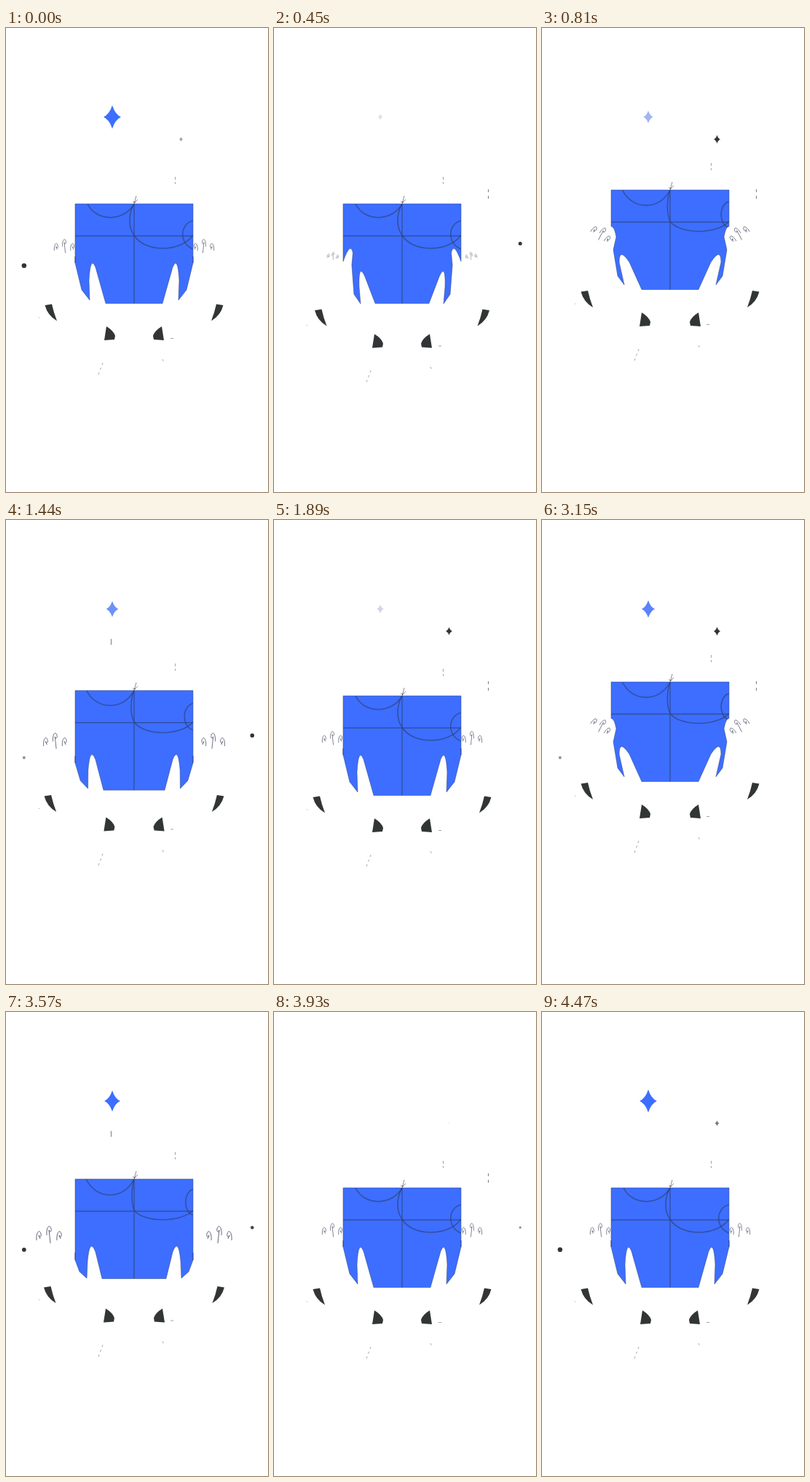
An HTML page with a canvas for the animation above (4.5 s loop, 360x636 px).

```html
<!DOCTYPE html>
<html>
<head>
<meta charset="utf-8">
<style>
html, body { margin: 0; width: 100%; height: 100%; overflow: hidden; background: #fff; }
canvas { display: block; width: 100%; height: 100%; }
</style>
</head>
<body>
<canvas id="stage" width="360" height="636"></canvas>
<script>
const ctx = document.getElementById('stage').getContext('2d');
const LOOP = 4500, JUMP = 2250, TWINKLE = 1125, STEP = 30;
const REST_TOP = 241, BOX_HEIGHT = 136.5, AXIS = 176;
const BLUE = [61, 110, 255], INK = [50, 53, 54], PALE = [222, 224, 230];
const LINE = 'rgba(45,62,110,.62)', FAINT = 'rgba(70,70,85,.7)';

const mix = (a, b, u) => a + (b - a) * u;
const clamp = u => Math.min(1, Math.max(0, u));
const ramp = (time, from, to) => {
  const u = clamp((time - from) / (to - from));
  return u * u * (3 - 2 * u);
};
const bump = (time, from, full, fade, end) => ramp(time, from, full) - ramp(time, fade, end);

// Sparkles swell and shrink around a centre time, wrapping over the twinkle period.
function glow(time, centre, halfWidth) {
  const offset = (time - centre + TWINKLE * 1.5) % TWINKLE - TWINKLE / 2;
  return Math.abs(offset) < halfWidth ? Math.cos(Math.PI / 2 * offset / halfWidth) ** .6 : 0;
}

function tint(color, strength) {
  const u = clamp((strength - .35) / .5);
  return `rgb(${color.map((c, i) => mix(PALE[i], c, u))})`;
}

function star(x, y, height, color, strength) {
  const h = height * strength, w = h * .75, p = h * .24;
  ctx.fillStyle = tint(color, strength);
  ctx.beginPath();
  ctx.moveTo(x, y - h);
  ctx.quadraticCurveTo(x + p, y - p, x + w, y);
  ctx.quadraticCurveTo(x + p, y + p, x, y + h);
  ctx.quadraticCurveTo(x - p, y + p, x - w, y);
  ctx.quadraticCurveTo(x - p, y - p, x, y - h);
  ctx.fill();
}

function dot(x, y, radius, strength) {
  ctx.fillStyle = tint(INK, strength);
  ctx.beginPath();
  ctx.arc(x, y, radius * strength, 0, 7);
  ctx.fill();
}

function stroke(path, color, width, dash = []) {
  ctx.strokeStyle = color;
  ctx.lineWidth = width;
  ctx.setLineDash(dash);
  ctx.stroke(new Path2D(path));
  ctx.setLineDash([]);
}

function shifted(x, y, draw) {
  ctx.save();
  ctx.translate(x, y);
  draw();
  ctx.restore();
}

function bothSides(draw) {
  draw();
  shifted(AXIS * 2, 0, () => {
    ctx.scale(-1, 1);
    draw();
  });
}

// The covered half of the box: arm gap at the side, leg gap at the hem.
function halfBox(top, pose) {
  const path = new Path2D();
  path.moveTo(AXIS, top);
  path.lineTo(95, top);
  path.lineTo(95, pose(322, -2, -50, 18));
  path.quadraticCurveTo(
    pose(95, 10, 4, 0), pose(310, -18, -39, 15),
    pose(95, 13.5, 7, 0), pose(314, -6, -28, 18));
  path.lineTo(pose(95, 12, 3, 0), pose(322, 3, -18, 18));
  path.lineTo(pose(104, 6, 0, -3), pose(359, 6, -19, -3));
  path.lineTo(pose(115, 4, -2, -4), pose(373, 5, -21, -8));
  path.lineTo(pose(114, 3, -8, -2), pose(346, 9, -25, -4));
  path.quadraticCurveTo(
    pose(116, 0, -10, -1), pose(311, 10, -11, -3),
    pose(123, 2, -3, 0), pose(328, 13, -7, 1));
  path.lineTo(pose(137, 2, 0, -5), top + BOX_HEIGHT);
  path.lineTo(AXIS, top + BOX_HEIGHT);
  return path;
}

function box(top, pose) {
  const half = halfBox(top, pose);
  const mirror = new DOMMatrix([-1, 0, 0, 1, AXIS * 2, 0]);
  const shape = new Path2D(half);
  shape.addPath(half, mirror);
  ctx.fillStyle = `rgb(${BLUE})`;
  ctx.fill(shape);
  ctx.strokeStyle = LINE;
  ctx.lineWidth = .8;
  ctx.stroke(shape);

  ctx.save();
  ctx.clip(shape);
  ctx.translate(0, top);
  const bend = pose(0, 0, .8, 1);
  const at = (a, b) => mix(a, b, bend);
  const dip = at(25, 29), back = at(168, 172), sag = at(67, 60), nose = at(238, 243.5);
  stroke('M95 44H257M176 0V137', LINE, 1.4);
  stroke(`M${at(112, 110)} 0C124 ${dip} 162 ${dip} 176 0`, LINE, 1.6);
  stroke(`M176 0C${back} 14 ${back} 32 176 43C190 ${sag} 240 ${sag} 257 43`, LINE, 1.6);
  stroke(`M257 ${at(23, 14)}C${nose} ${at(28, 18)} ${nose} ${at(55, 46)} 257 ${at(62, 49)}`, LINE, 1.6);
  ctx.restore();
  shifted(0, top, () => stroke('M176 0L179 -11M176 -1L181 -6M174 -3L178 -2', FAINT, .9));
}

function hand(pose) {
  shifted(pose(80, 1, 2, -21), pose(298, 14, -17, 6), () => {
    const size = pose(.8, -.35, 0, .2);
    ctx.rotate(pose(0, .1, .6, 0));
    ctx.scale(size, size);
    for (let finger = -1; finger <= 1; finger++) {
      const length = finger ? 6 : 19;
      shifted(finger * 14, finger ? 1 : -6, () =>
        stroke(`M-3 8C-4 -3 1 -8 3 -1C4 3 1 5 0 1L2 ${length}`, 'rgba(70,74,100,.85)', 1));
    }
  });
}

function feet(pose) {
  ctx.fillStyle = `rgb(${INK})`;
  shifted(pose(0, 2.5, 0, -1.5), pose(0, 7, -18.5, -2.5), () =>
    ctx.fill(new Path2D('M53.5 380L63 378.5L66 390L70 401.5Q57 394 53.5 380Z')));
  shifted(pose(0, 0, -1, -1), pose(0, 10.5, -19, -2.5), () =>
    ctx.fill(new Path2D('M138 409Q148 415 150 422L149 427L135 428Z')));
}

function specks(top, footY, phase) {
  shifted(0, top - REST_TOP, () => stroke('M232.5 204V214', FAINT, .7, [4, 3]));
  shifted(0, footY, () => {
    stroke('M133 459L127 475M215 454L218 460', FAINT, .7, [3, 4]);
    stroke('M226 425.5H230M45 397H46', FAINT, .7);
  });
  if (glow(phase, 690, 290)) stroke('M294.5 221V239', FAINT, 1, [4, 5]);
  if (glow(phase, 255, 130)) stroke('M144.5 163V171', FAINT, 1);
}

function render(time) {
  ctx.fillStyle = '#fff';
  ctx.fillRect(0, 0, 360, 636);

  const beat = time % JUMP, phase = time % TWINKLE;
  const crouch = bump(beat, 90, 470, 540, 810);
  const leap = bump(beat, 540, 810, 900, 1320);
  const stretch = bump(beat, 900, 1320, 1320, 1600);
  // A resting value plus its change in each phase of the jump.
  const pose = (rest, down, up, landing) =>
    rest + crouch * down + leap * up + stretch * landing;

  const top = pose(REST_TOP, 0, -19, -12);
  specks(top, pose(0, 10.5, -19, -2.5), phase);
  bothSides(() => hand(pose));
  box(top, pose);
  bothSides(() => feet(pose));

  star(146, 122, 16, BLUE, glow(phase, 30, 450));
  star(240.5, 152.5, 6, INK, glow(phase, 870, 330));
  dot(24.8, 325.8, 3.3, glow(phase, 45, 370));
  dot(338.3, 295.4, 2.8, glow(phase, 340, 290));
}

const start = performance.now();
function tick() {
  const time = (performance.now() - start) % LOOP;
  render(Math.floor(time / STEP) * STEP);
  requestAnimationFrame(tick);
}
tick();
</script>
</body>
</html>
```
